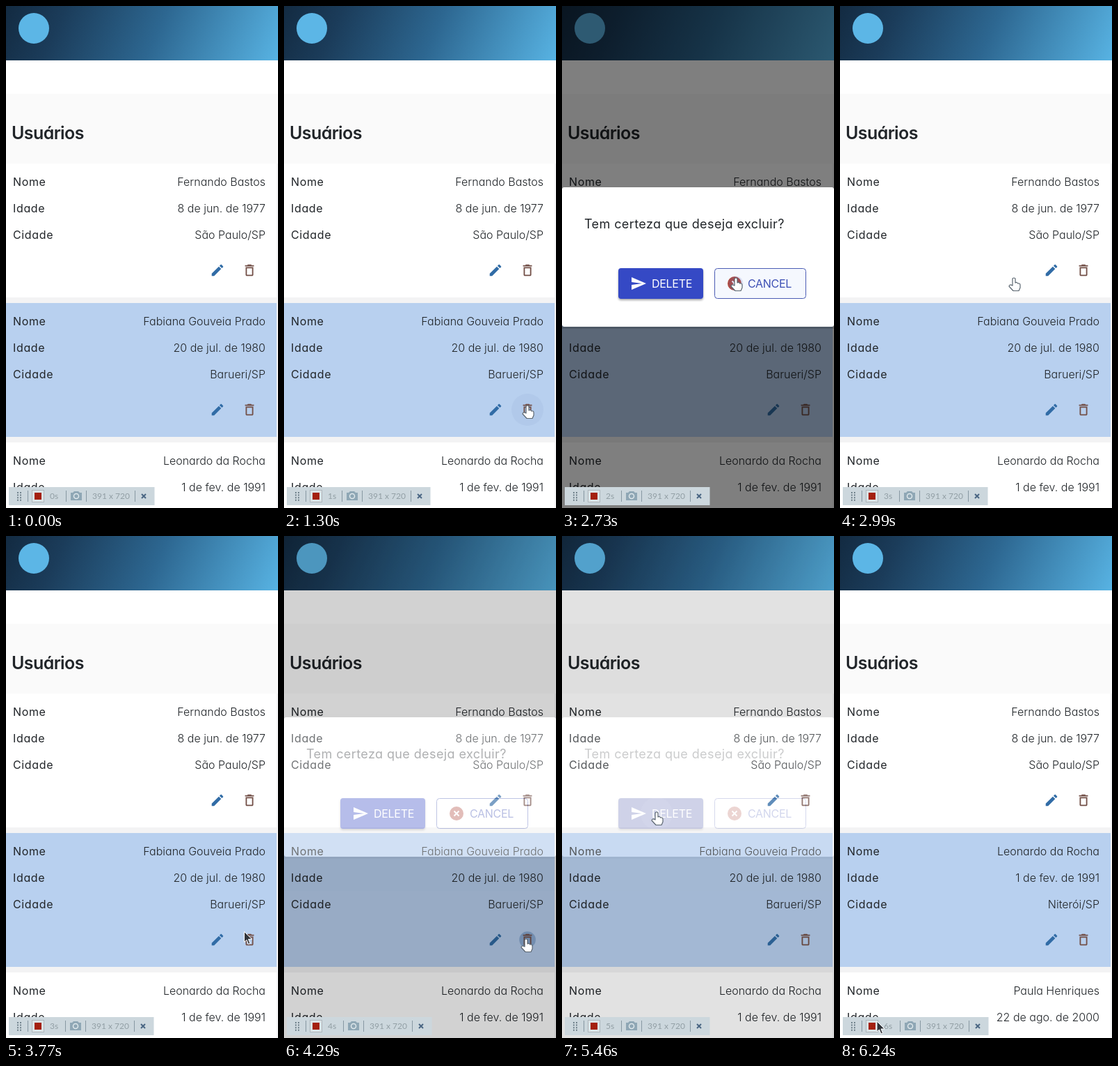
An HTML page that plays this animation: 391 px wide and 720 px high, repeating every 6370 ms.

```html
<!DOCTYPE html>
<html lang="pt-BR">
<head>
<meta charset="utf-8">
<title>Usuários</title>
<style>
html, body { margin: 0; width: 100%; height: 100%; overflow: hidden; background: #fff }
svg { display: block; width: 391px; height: 720px; font: 300 16px Inter, Lato, sans-serif; font-feature-settings: "cv11"; fill: #212529 }
.title { font-size: 25px; font-weight: 600; letter-spacing: -.6px }
.question { font-size: 18px; font-weight: 400; letter-spacing: .4px }
.button { font-weight: 400; letter-spacing: -.3px }
.label { font-weight: 400; letter-spacing: .65px }
.value { text-anchor: end }
.bar { font: 12px Lato, sans-serif; fill: #929fa5 }
</style>
</head>
<body>
<svg viewBox="0 0 391 720">
  <defs>
    <linearGradient id="sky" gradientUnits="userSpaceOnUse" x1="20" y1="-40" x2="371" y2="118">
      <stop offset="0" stop-color="#132b42"/><stop offset=".2" stop-color="#1b3c5a"/>
      <stop offset=".55" stop-color="#2d6791"/><stop offset="1" stop-color="#57b2e2"/>
    </linearGradient>
    <filter id="shade" x="-10%" y="-20%" width="120%" height="150%">
      <feDropShadow dx="0" dy="2" stdDeviation="1.5" flood-opacity=".35"/>
    </filter>
    <path id="edit" d="M3 17.25V21h3.75L17.81 9.94l-3.75-3.75zM20.71 7.04c.39-.39.39-1.02 0-1.41l-2.34-2.34c-.39-.39-1.02-.39-1.41 0l-1.83 1.83 3.75 3.75z"/>
    <path id="trash" fill-rule="evenodd" d="M6 19c0 1.1.9 2 2 2h8c1.1 0 2-.9 2-2V7H6zM8 9h8v10H8zM15.5 4l-1-1h-5l-1 1H5v2h14V4z"/>
  </defs>

  <rect width="391" height="720" fill="#fff"/>
  <rect width="391" height="78" fill="url(#sky)"/>
  <circle cx="40" cy="32" r="22" fill="#5cb6e6"/>
  <rect y="126" width="391" height="100" fill="#fafafa"/>
  <rect y="226" width="391" height="494" fill="#f3f3f4"/>
  <text class="title" x="8" y="191">Usuários</text>
  <g id="cards"></g>

  <g id="dialog">
    <path fill-opacity=".5" fill="#000" fill-rule="evenodd" d="M0 0H391V720H0zM4 260H387q4 0 4 4V456q0 4-4 4H4q-4 0-4-4V264q0-4 4-4z"/>
    <path d="M0 460H391V463H0z" fill="#000" opacity=".15"/>
    <rect y="260" width="391" height="200" rx="4" fill="#fff"/>
    <text class="question" x="32" y="319">Tem certeza que deseja excluir?</text>
    <rect id="delete" x="81" y="376" width="122" height="44" rx="4" filter="url(#shade)"/>
    <path transform="translate(98 386)" fill="#fff" d="M2 21 23 12 2 3v7l15 2-15 2z"/>
    <text class="button" x="129" y="403.5" fill="#fff">DELETE</text>
    <rect id="cancel" x="219.5" y="376.5" width="131" height="43" rx="4" stroke="#4b5cb4"/>
    <circle cx="248" cy="398" r="10" fill="#b0493d"/>
    <path d="m244.5 394.5 7 7m0-7-7 7" stroke="#fff" stroke-width="2"/>
    <text class="button" x="267" y="403.5" fill="#3f51b5">CANCEL</text>
    <circle id="press" cy="398"/>
  </g>

  <g class="bar">
    <rect id="panel" x="4" y="690" height="26" fill="#ccd7dd"/>
    <path d="M17 697v13m4-13v13" stroke="#72838d" stroke-width="2" stroke-dasharray="2 1.6"/>
    <path d="M31.5 695v16" stroke="#8798a2"/>
    <rect x="37.5" y="694.5" width="17" height="17" fill="#dce3e6" stroke="#aeb8bd"/>
    <rect x="41" y="698" width="10" height="10" fill="#a4200f"/>
    <text id="clock" x="63" y="707"></text>
    <g id="tools">
      <path d="M86.5 695v16M115.5 695v16M185.5 695v16" stroke="#8798a2"/>
      <path fill="#8fa7b5" d="M93 698h3l2-2h6l2 2h3v11H93z"/>
      <circle cx="101" cy="703" r="3.5" fill="#8fa7b5" stroke="#dfe8ec" stroke-width="1.5"/>
      <text x="124" y="707">391 x 720</text>
      <path d="m195 700 6 6m0-6-6 6" stroke="#4a6683" stroke-width="2"/>
    </g>
  </g>

  <g id="cursor">
    <path id="hand" fill="#fff" stroke="#5b6670" stroke-width="1.2" stroke-linejoin="round" d="M-2 2Q-2 0 0 0T2 2V7Q4.5 5.5 5.5 8 9 7 9 10.5V14L7 18.5H-1L-7 12Q-6.5 8.5-2 11z"/>
    <path id="arrow" fill="#30343a" stroke="#fff" d="M0 0V15L3.5 12 6 18 8.5 17 6 11H11z"/>
  </g>
</svg>
<script>
const LOOP = 6370, STEP = 130;
const $ = id => document.getElementById(id);
const set = (id, attrs) => { for (const k in attrs) $(id).setAttribute(k, attrs[k]); };
const within = (t, spans) => spans.some(([a, b]) => t >= a && t < b);
const ramp = (t, start, length) => Math.max(0, Math.min(1, (t - start) / length));

const users = [
  ['Fernando Bastos', '8 de jun. de 1977', 'São Paulo/SP'],
  ['Fabiana Gouveia Prado', '20 de jul. de 1980', 'Barueri/SP'],
  ['Leonardo da Rocha', '1 de fev. de 1991', 'Niterói/SP'],
  ['Paula Henriques', '22 de ago. de 2000', 'São Paulo/SP']
];

const icon = (name, x, fill) =>
  `<use href="#${name}" transform="translate(${x} 153) scale(.92) translate(-12 -12)" fill="${fill}"/>`;

function card(user, i) {
  const rows = ['Nome', 'Idade', 'Cidade'].map((label, k) => {
    const y = 32 + 38 * k;
    return `<text class="label" x="10" y="${y}">${label}</text><text class="value" x="373" y="${y}">${user[k]}</text>`;
  }).join('');
  const feedback = `<circle id="hover" cx="350" cy="153" r="23" fill="#b1c9ea"/>
    <circle id="ripple" cx="350" cy="153" fill="#5480b4"/>`;
  return `<g transform="translate(0 ${226 + 200 * i})">
    <rect width="389" height="192" fill="${i % 2 ? '#b8d0ef' : '#fff'}"/>${rows}
    ${i === 1 ? feedback : ''}${icon('edit', 304, '#316ca6')}${icon('trash', 350, '#735048')}</g>`;
}

// Pointer stops: time, x, y
const stops = [
  [260, 200, 735], [1000, 350, 573], [1500, 350, 573], [2200, 250, 390], [3000, 250, 390],
  [3900, 348, 578], [4400, 348, 578], [5150, 136, 396], [5600, 136, 396], [6200, 53, 696], [LOOP, 53, 696]
];

function pointer(t) {
  const i = Math.max(1, stops.findIndex(s => s[0] >= t));
  const [a, b] = [stops[i - 1], stops[i]];
  const p = ramp(t, a[0], b[0] - a[0]), e = p * p * (3 - 2 * p);
  return [1, 2].map(k => a[k] + (b[k] - a[k]) * e);
}

function ripple(id, t, start, strength) {
  const age = t - start, on = age >= 0 && age < 550;
  set(id, { r: on ? 23 * ramp(age, 0, 175) : 0, opacity: on ? strength * (1 - age / 550) : 0 });
}

let shown;
function list(removed) {
  if (shown === removed) return;
  shown = removed;
  $('cards').innerHTML = users.filter((_, i) => !(removed && i === 1)).slice(0, 3).map(card).join('');
}

function draw(now) {
  const t = Math.floor(now % LOOP / STEP) * STEP;
  list(t >= 5590);

  const open = ramp(t, 1450, 225) - ramp(t, 2740, 195) + ramp(t, 4210, 225) - ramp(t, 5309, 195);
  set('dialog', { opacity: open });
  set('delete', { fill: within(t, [[5020, 5600]]) ? '#303f9f' : '#3448c5' });
  set('cancel', { fill: within(t, [[2080, 3000]]) ? '#f5f8fe' : '#fff' });
  set('hover', { opacity: within(t, [[940, 1560], [3820, 4210]]) ? 1 : 0 });
  ripple('ripple', t, t < 3000 ? 1400 : 4200, .55);
  const second = t > 4000;
  set('press', { cx: second ? 136 : 250, fill: second ? '#fff' : '#5b70c4' });
  ripple('press', t, second ? 5240 : 2650, second ? .1 : .2);

  const s = Math.floor((t + 20) / 1000);
  const shift = s === 1 ? -3 : s === 0 || s === 6 ? 0 : -1;
  $('clock').textContent = s + 's';
  set('tools', { transform: `translate(${shift} 0)` });
  set('panel', { width: 209.5 + shift });

  const hand = within(t, [[940, 1600], [2050, 3100], [3820, 4550], [5000, 5680]]);
  set('cursor', { transform: `translate(${pointer(t)})`, opacity: t < 260 ? 0 : 1 });
  set('hand', { opacity: +hand });
  set('arrow', { opacity: +!hand });
  requestAnimationFrame(() => draw(performance.now() - begin));
}
const begin = performance.now();
draw(0);
</script>
</body>
</html>
```
